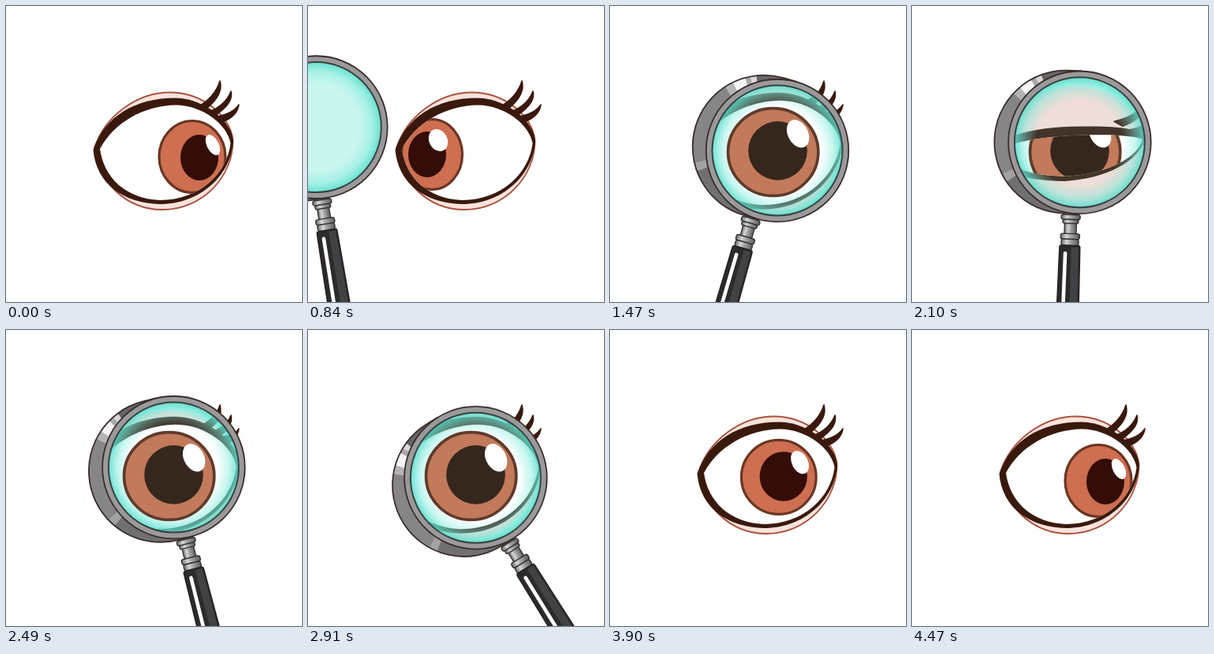
These frames come from a looping animation (375 by 375 pixels, 4.5 s). An HTML page:

```html
<!DOCTYPE html>
<html lang="en">
<head>
<meta charset="utf-8">
<title>Eye and magnifying glass</title>
<style>
html, body { margin: 0; width: 100%; height: 100%; overflow: hidden; background: #fff; }
svg { display: block; width: 100vw; height: 100vh; }
</style>
</head>
<body>
<svg viewBox="0 0 375 375">
  <defs>
    <clipPath id="open"><path id="openPath"/></clipPath>
    <clipPath id="disc"><circle id="discShape" r="82.5"/></clipPath>
    <clipPath id="side"><path d="M0-90.5H-17.5A90.5 90.5 0 0 0-17.5 90.5H0Z"/></clipPath>
    <radialGradient id="edge">
      <stop offset=".66" stop-color="#7ceadb" stop-opacity="0"/>
      <stop offset=".84" stop-color="#7ceadb" stop-opacity=".42"/>
      <stop offset="1" stop-color="#50dcc8" stop-opacity=".88"/>
    </radialGradient>
    <linearGradient id="steel">
      <stop offset="0" stop-color="#6a6a6a"/>
      <stop offset=".3" stop-color="#d6d6d6"/>
      <stop offset=".55" stop-color="#a2a2a2"/>
      <stop offset="1" stop-color="#5c5c5c"/>
    </linearGradient>
  </defs>
  <g id="eye"></g>
  <g id="body"></g>
  <g clip-path="url(#disc)">
    <rect width="375" height="375" fill="#c9f6ef"/>
    <g id="zoomLids"></g>
    <circle id="tint" r="83" fill="url(#edge)"/>
    <g id="zoomBall"></g>
  </g>
  <g id="rim" fill="none">
    <circle r="86.5" stroke="#9a9a9a" stroke-width="7"/>
    <circle r="90.3" stroke="#3a2c28" stroke-width="1.8"/>
    <circle r="82.5" stroke="#3c4040" stroke-width="2"/>
  </g>
</svg>
<script>
const LOOP = 4500;
const $ = id => document.getElementById(id);
const lerp = (a, b, k) => a + (b - a) * k;
const ramp = (t, a, b) => Math.min(1, Math.max(0, (t - a) / (b - a)));
const smooth = (t, a, b) => { const k = ramp(t, a, b); return k * k * (3 - 2 * k); };

const PLAIN = { skin: '#fbe3dc', edge: '#a9513f', lid: '#3a190d', iris: '#cd6f50', ring: '#6b3522', pupil: '#340d08' };
const TINTED = { skin: '#eeddd8', edge: 'none', lid: '#43342a', iris: '#c27a5b', ring: '#5f3a2b', pupil: '#35271d' };

const SKIN = 'M112 180C125 140 165 109.5 208 109.5C250 109.5 284 140 287.5 170C288 215 250 258 198 258C152 258 116 222 112 180Z';
const LASHES = 'M243 128Q265 115 271 95Q276 112 254 130Z' +
  'M257 134Q278 126 285 108Q289 122 266 138Z' +
  'M268 140Q288 136 295 125Q293 140 274 147Z';

// Iris, pupil and glint as [cx, cy, rx, ry] for a look left, ahead and right
const LOOKS = {
  iris: [[157, 188, 38.5, 44.5], [207, 185, 49, 47.5], [236, 191, 42, 45.5]],
  pupil: [[151, 188, 24, 29], [212, 183.5, 32, 32], [245, 192, 24, 29]],
  glint: [[165, 170, 11.5, 14.5], [234, 165, 11, 16], [262, 176, 7.5, 14]]
};

function ellipse(part, look, attrs, turn = 0) {
  const [left, mid, right] = LOOKS[part];
  const side = look < 0 ? left : right;
  const [x, y, rx, ry] = mid.map((v, i) => lerp(v, side[i], Math.abs(look)));
  return `<ellipse rx="${rx}" ry="${ry}" transform="translate(${x} ${y}) rotate(${turn})" ${attrs}/>`;
}

// Both outlines sink towards a slanted line, higher on the right, as the eye shuts
function lidPath(shut) {
  const y = (from, to) => lerp(from, to, shut);
  return `M110.5 182C125 ${y(140, 181)} 163 ${y(116.5, 180)} 215 ${y(116.5, 180)}` +
    `C255 ${y(118, 177)} 287 ${y(148, 166)} 288 ${y(172, 163)}` +
    `C284 ${y(216, 180)} 245 ${y(251, 193)} 195 ${y(251, 198)}` +
    `C150 ${y(250, 198)} 114 ${y(226, 197)} 110.5 182Z`;
}

function openingPath(shut) {
  const y = (from, to) => lerp(from, to, shut);
  return `M119 181C136 ${y(148, 190)} 175 ${y(126, 191)} 215 ${y(125.5, 191)}` +
    `C250 ${y(126, 188)} 280 ${y(150, 178)} 284.5 ${y(174, 168)}` +
    `C280 ${y(212, 177)} 245 ${y(246, 188)} 195 ${y(246, 192)}` +
    `C152 ${y(244, 192)} 124 ${y(218, 191)} 119 181Z`;
}

function lids(c, shut) {
  return `<path d="${SKIN}" fill="${c.skin}" stroke="${c.edge}" stroke-width="1.8"/>
    <path d="${LASHES}" fill="${c.lid}" stroke="${c.lid}" stroke-width="1.6" stroke-linejoin="round"
      transform="translate(${10 * shut} ${41 * shut}) rotate(${30 * shut} 255 135)"/>
    <path d="${lidPath(shut)}" fill="${c.lid}"/>
    <path d="${openingPath(shut)}" fill="#fff"/>`;
}

function ball(c, look, grow) {
  return `<g clip-path="url(#open)"><g transform="translate(207 185) scale(${grow}) translate(-207 -185)">
    ${ellipse('iris', look, `fill="${c.iris}" stroke="${c.ring}" stroke-width="3.2"`)}
    ${ellipse('pupil', look, `fill="${c.pupil}"`)}
    ${ellipse('glint', look, 'fill="#fff"', -27)}</g></g>`;
}

// Slice of the metal side between two angles above its left point
function wedge(a, b, fill) {
  const p = deg => {
    const r = deg * Math.PI / 180;
    return `${-17.5 - 130 * Math.cos(r)} ${-130 * Math.sin(r)}`;
  };
  return `<path d="M-17.5 0L${p(a)} ${p(b)}Z" fill="${fill}"/>`;
}

function bar(y, w, h, r = 2.5) {
  return `<rect x="${-8 - w / 2}" y="${y}" width="${w}" height="${h}" rx="${r}" fill="url(#steel)" stroke="#333" stroke-width="1.4"/>`;
}

$('body').innerHTML = bar(87, 20, 6) + bar(102, 15, 16, 0) + bar(92, 24, 6) + bar(98, 20, 5) +
  bar(116, 24, 7) + bar(123, 22, 8) +
  `<path d="M-19 131H3Q5 131 5 134L7 310H-23L-21 134Q-21 131-19 131Z" fill="#2b2b2b" stroke="#2a1e1a" stroke-width="1.4"/>
   <path d="M-6 133H3L5 310H-6Z" fill="#414243"/>
   <path d="M-13.5 141L-14.5 310" stroke="#fff" stroke-width="4.6" stroke-linecap="round"/>
   <g clip-path="url(#side)"><rect x="-110" y="-95" width="120" height="190" fill="#868686"/>` +
  wedge(41, 48, '#b4b4b4') + wedge(48, 59, '#f4f4f4') + wedge(59, 63, '#a8a8a8') + wedge(63, 68, '#d8d8d8') +
  wedge(68, 100, '#666') + wedge(-36, -29, '#a3a3a3') + wedge(-100, -36, '#707070') +
  `</g><path d="M0-90.5H-17.5A90.5 90.5 0 0 0-17.5 90.5H0" fill="none" stroke="#3a2c28" stroke-width="1.8"/>
   <path d="M-5-89.5A91 91 0 0 0-5 89.5" fill="none" stroke="#444" stroke-width="1"/>`;

// Lens centre and tilt: sweep in, swing in place, sweep out
function lens(t) {
  if (t < 1650) {
    const s = Math.min(t, 1470);
    return [212 - 0.3206 * (1470 - s), 148 + 1.73e-4 * (s - 1020) ** 2, 16 - 0.0403 * (1470 - s)];
  }
  if (t < 3120) {
    const s = Math.min(t, 2910);
    const tilt = s < 2100 ? lerp(16, 2, ramp(s, 1650, 2100)) : lerp(2, -32, ramp(s, 2100, 2910));
    return [212.4, 172 + 3.5e-5 * (s - 2250) ** 2, tilt];
  }
  const k = (t - 3120) / 390;
  return [212.4 + 136.6 * k, 187.2 + 27.8 * k, -32 + 21.5 * k];
}

function gaze(t) {
  if (t < 1000) return 1 - 2 * smooth(t, 15, 550);
  if (t < 2500) return smooth(t, 1095, 1470) - 1;
  return smooth(t, 3640, 4470);
}

function draw(t) {
  const look = gaze(t);
  const shut = smooth(t, 1980, 2190) - smooth(t, 2250, 2470);
  const [x, y, tilt] = lens(t);
  const fx = lerp(208, x, 0.5);
  $('openPath').setAttribute('d', openingPath(shut));
  $('eye').innerHTML = lids(PLAIN, shut) + ball(PLAIN, look, 1);
  $('zoomLids').innerHTML = lids(TINTED, shut);
  $('zoomBall').innerHTML = ball(TINTED, look, 1.06);
  const zoom = `translate(${fx} 184) scale(1.1) translate(${-fx} -184)`;
  for (const id of ['zoomLids', 'zoomBall']) $(id).setAttribute('transform', zoom);
  $('body').setAttribute('transform', `translate(${x} ${y}) rotate(${tilt})`);
  for (const id of ['discShape', 'tint', 'rim']) $(id).setAttribute('transform', `translate(${x} ${y})`);
}

const start = performance.now();
function tick() {
  draw((performance.now() - start) % LOOP);
  requestAnimationFrame(tick);
}
tick();
</script>
</body>
</html>
```
